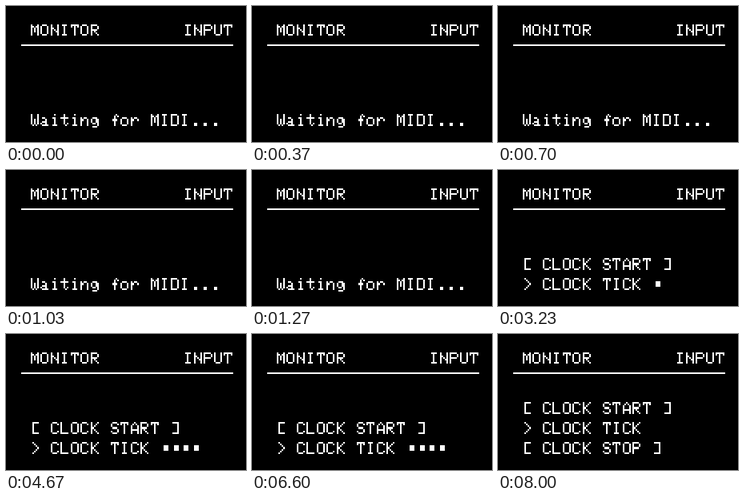
Animation, 300 px wide and 170 px high, one loop 10000 ms. Source, as an HTML page with a canvas:

```html
<!DOCTYPE html>
<html lang="en">
<head>
<meta charset="utf-8">
<title>MIDI monitor</title>
<style>
  html, body { margin: 0; width: 100%; height: 100%; overflow: hidden; background: #000; }
  canvas { display: block; }
</style>
</head>
<body>
<canvas id="screen" width="300" height="170" role="img" aria-label="MIDI monitor display"></canvas>
<script>
const ctx = document.getElementById('screen').getContext('2d');
const LOOP = 10000;
const DOT = 25 / 12;          // one display dot in stage pixels
const ADVANCE = 6 * DOT;
const LEFT = 30.55;
const TITLE_Y = 22.7;
const ROWS = [85.2, 110.2, 135.2];

// Strokes on a 5x8 dot grid: "xy" points joined by lines, strokes split by commas.
const STROKES = {
  A: '06 02 20 42 46,14 34',
  C: '41 30 10 01 05 16 36 45',
  D: '06 00 30 41 45 36 06',
  I: '10 30,20 26,16 36',
  K: '00 06,40 13 46',
  L: '00 06 46',
  M: '06 00 22 40 46,22 24',
  N: '00 06,12 34,40 46',
  O: '10 30 41 45 36 16 05 01 10',
  P: '06 00 30 41 42 33 03',
  R: '06 00 30 41 42 33 03,24 46',
  S: '41 30 10 01 02 13 33 44 45 36 16 05',
  T: '01 00 40 41,20 26',
  U: '00 05 16 36 45 40',
  W: '00 05 16 25 23,25 36 45 40',
  a: '12 22 33 36 46,34 14 05 16 36',
  f: '26 21 30 41,13 33',
  g: '32 12 03 04 15 25 34 32 43 46 37 17',
  i: '12 22 26,16 36,20',
  n: '02 06,13 22 32 43 46',
  o: '12 32 43 45 36 16 05 03 12',
  r: '02 06,13 22 32 43',
  t: '02 42,20 25 36 45',
  '.': '25 35 36 26 25',
  '[': '40 10 16 46',
  ']': '10 40 46 16',
  '>': '10 43 16',
  '▪': '22 42 43 23 24 44',
  '▂': '24 44',
};

function dotsOf(strokes) {
  const dots = new Set();
  for (const stroke of strokes.split(',')) {
    const points = stroke.split(' ').map(p => [+p[0], +p[1]]);
    points.forEach(([x, y], i) => {
      const [endX, endY] = points[i + 1] || [x, y];
      const steps = Math.max(Math.abs(endX - x), Math.abs(endY - y));
      for (let s = 0; s <= steps; s++) {
        const k = steps ? s / steps : 0;
        dots.add(Math.round(x + (endX - x) * k) + 5 * Math.round(y + (endY - y) * k));
      }
    });
  }
  return [...dots].map(d => [d % 5, Math.floor(d / 5)]);
}

const GLYPHS = { ' ': [] };
for (const ch in STROKES) GLYPHS[ch] = dotsOf(STROKES[ch]);

// Fills a box whose edges snap to whole pixels.
function fillBox(x, y, width, height) {
  const left = Math.round(x), top = Math.round(y);
  ctx.fillRect(left, top, Math.round(x + width) - left, Math.round(y + height) - top);
}

function write(text, left, top) {
  [...text].forEach((ch, i) => {
    for (const [x, y] of GLYPHS[ch]) {
      fillBox(left + i * ADVANCE + x * DOT, top + y * DOT, DOT, DOT);
    }
  });
}

// Log states: start time, then the upper, middle and bottom lines.
const START = '[ CLOCK START ]';
const TICK = '> CLOCK TICK';
const running = (time, marks) => [time, '', START, TICK + ' ' + marks];
const STATES = [
  [0, '', '', 'Waiting for MIDI...'],
  running(1330, '▪'),
  running(1830, '▪▪'),
  running(2370, '▪▪▪'),
  running(2730, '▪▪▪▪'),
  running(3230, '▪'),
  running(3770, '▪▪'),
  running(4130, '▪▪▪'),
  running(4670, '▪▪▪▪'),
  running(5200, '▪'),
  running(5570, '▪▂'),
  running(5730, '▪▪'),
  running(6100, '▪▪▪'),
  running(6600, '▪▪▪▪'),
  running(7130, '▪'),
  [7630, START, TICK, '[ CLOCK STOP ]'],
];

function draw(time) {
  const [, ...lines] = STATES.filter(state => state[0] <= time).pop();
  ctx.fillStyle = '#000';
  ctx.fillRect(0, 0, 300, 170);
  ctx.fillStyle = '#fff';
  write('MONITOR', LEFT, TITLE_Y);
  write('INPUT', LEFT + 92 * DOT, TITLE_Y);
  lines.forEach((line, i) => write(line, LEFT, ROWS[i]));
  fillBox(19, TITLE_Y + 12 * DOT, 127 * DOT, DOT);
}

const begin = performance.now();
function frame() {
  draw((performance.now() - begin) % LOOP);
  requestAnimationFrame(frame);
}
frame();
</script>
</body>
</html>
```
